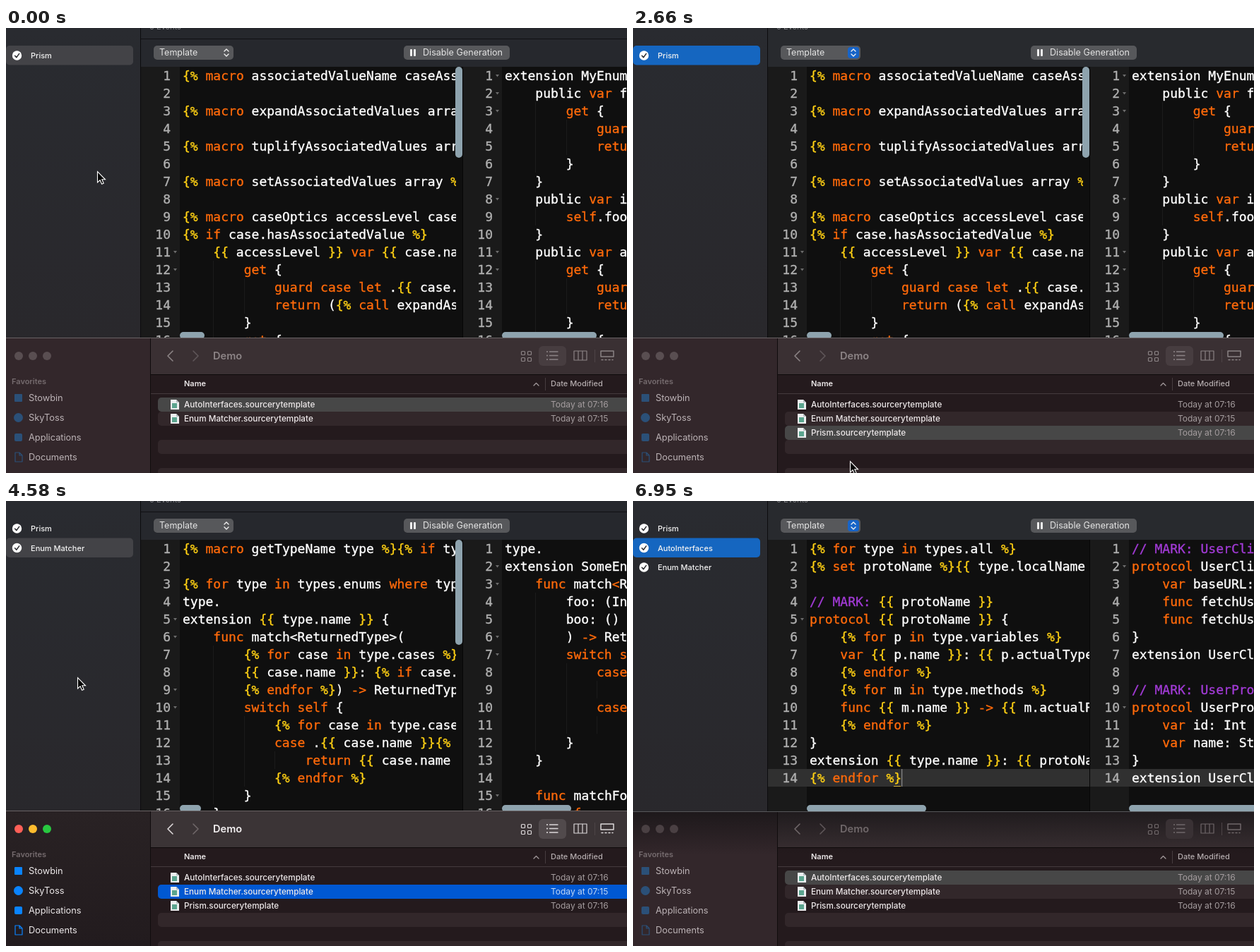
An HTML page that plays this animation: 879 by 631 pixels, repeating every 7.7 s.

```html
<!DOCTYPE html>
<html lang="en">
<head>
<meta charset="utf-8">
<title>Template drag and drop</title>
<style>
html, body { margin: 0; width: 100%; height: 100%; overflow: hidden; background: #26272b; }
svg { display: block; width: 100%; height: 100%; }
text { font-family: Inter, "Open Sans", sans-serif; white-space: pre; }
.code { font: 18px "DejaVu Sans Mono", monospace; color: #fff; }
.code, .code tspan { fill: currentColor; stroke: currentColor; stroke-width: .35; }
.num { color: #b0b0b0; text-anchor: end; }
.tag { color: #ffd014; }
.key { color: #ff6a0a; }
.note { color: #a23bd6; }
</style>
</head>
<body>
<svg id="stage" viewBox="0 0 879 631" xmlns="http://www.w3.org/2000/svg"></svg>
<script>
const LOOP = 7700, TICK = 147.6, CHAR = 10.836, ROW = 25;

const PRISM = {
  left: `{% macro associatedValueName caseAssociated

{% macro expandAssociatedValues array %}

{% macro tuplifyAssociatedValues array %}

{% macro setAssociatedValues array %}

{% macro caseOptics accessLevel cases %}
{% if case.hasAssociatedValue %}
    {{ accessLevel }} var {{ case.name }}
        get {
            guard case let .{{ case.name }}
            return ({% call expandAssociated
        }
        get {`,
  right: `extension MyEnum {
    public var foo
        get {
            guard case
            return
        }
    }
    public var isFoo
        self.foo
    }
    public var associated
        get {
            guard case
            return
        }
        get {`,
  foldsL: [11, 12], foldsR: [1, 2, 3, 8, 11, 12], bar: 129, barL: 35, barR: 134
};
const MATCHER = {
  left: `{% macro getTypeName type %}{% if type

{% for type in types.enums where type
type.
extension {{ type.name }} {
    func match<ReturnedType>(
        {% for case in type.cases %}
        {{ case.name }}: {% if case.has
        {% endfor %}) -> ReturnedType
        switch self {
            {% for case in type.cases
            case .{{ case.name }}{% if
                return {{ case.name
            {% endfor %}
        }
    }`,
  right: `type.
extension SomeEnum {
    func match<Return
        foo: (Int)
        boo: ()
        ) -> Returned
        switch self
            case
${' '.repeat(16)}
            case
${' '.repeat(16)}
        }
    }

    func matchFoo
        if`,
  foldsL: [5, 6, 9, 10], foldsR: [2, 3, 6, 7, 15], bar: 149, barL: 30, barR: 98
};
const AUTO = {
  left: `{% for type in types.all %}
{% set protoName %}{{ type.localName }}

// MARK: {{ protoName }}
protocol {{ protoName }} {
    {% for p in type.variables %}
    var {{ p.name }}: {{ p.actualType
    {% endfor %}
    {% for m in type.methods %}
    func {{ m.name }} -> {{ m.actualReturn
    {% endfor %}
}
extension {{ type.name }}: {{ protoName
{% endfor %}`,
  right: `// MARK: UserClient
protocol UserClient
    var baseURL: URL
    func fetchUser
    func fetchUsers
}
extension UserClient

// MARK: UserProfile
protocol UserProfile
    var id: Int
    var name: String
}
extension UserClient`,
  foldsL: [5], foldsR: [2, 10], bar: 0, barL: 169, barR: 200
};

const FILES = ['AutoInterfaces', 'Enum Matcher', 'Prism'];
const PLACES = ['Stowbin', 'SkyToss', 'Applications', 'Documents'];

// pointer stops: tick, x, y
const PATH = [
  [0, 129, 203], [2, 129, 203], [5, 86, 48], [6, 84, 44], [7, 96, 72], [8, 116, 130],
  [9, 141, 206], [10, 241, 505], [12, 293, 592], [15, 307, 614], [18, 307, 614],
  [21, 308, 565], [22, 308, 565], [26, 310, 555], [28, 200, 395], [29, 122, 270],
  [30, 101, 250], [32, 101, 250], [33, 112, 268], [37, 268, 518], [38, 274, 527],
  [41, 274, 527], [42, 252, 470], [43, 160, 240], [44, 96, 70], [45, 92, 62], [47, 300, 300]
];

const esc = s => s.replace(/&/g, '&amp;').replace(/</g, '&lt;').replace(/>/g, '&gt;');
const rect = (x, y, w, h, fill, r = 0, more = '') =>
  `<rect x="${x}" y="${y}" width="${w}" height="${h}" fill="${fill}" rx="${r}" ${more}/>`;
const dot = (x, y, r, fill) => `<circle cx="${x}" cy="${y}" r="${r}" fill="${fill}"/>`;
const line = (d, color, w = 1.4) =>
  `<path d="${d}" fill="none" stroke="${color}" stroke-width="${w}" stroke-linecap="round" stroke-linejoin="round"/>`;
const label = (x, y, s, size, fill, weight = 400) =>
  `<text x="${x}" y="${y}" font-size="${size}" fill="${fill}" font-weight="${weight}">${esc(s)}</text>`;
const moved = (x, y, body, opacity = 1) => `<g transform="translate(${x} ${y})" opacity="${opacity}">${body}</g>`;

function pointer(k) {
  const i = PATH.findIndex(p => p[0] > k);
  if (i < 0) return PATH[PATH.length - 1].slice(1);
  const [a, b] = [PATH[i - 1], PATH[i]];
  const f = (k - a[0]) / (b[0] - a[0]);
  return [a[1] + (b[1] - a[1]) * f, a[2] + (b[2] - a[2]) * f];
}

const TOKENS = new RegExp([
  '(?<note>\\/\\/ MARK:(?: User\\w+)?)', '(?<tag>\\{%|%\\}|\\{\\{|\\}\\})',
  '(?<key>->|(?<=^|guard )case\\b|<(?=Return\\b)|' +
  '\\b(?:macro|if|for|in|where|endfor|set|call|get|guard|let|return|var|func|switch|self|protocol)\\b)'
].join('|'), 'g');

function paint(text) {
  let out = '', end = 0;
  for (const m of text.matchAll(TOKENS)) {
    const kind = Object.keys(m.groups).find(g => m.groups[g]);
    out += esc(text.slice(end, m.index)) + `<tspan class="${kind}">${esc(m[0])}</tspan>`;
    end = m.index + m[0].length;
  }
  return out + esc(text.slice(end));
}

function codeLines(source, x, numX, folds) {
  return source.split('\n').map((text, i) => {
    const indent = text.search(/\S|$/), top = 55 + i * ROW;
    let out = `<text class="code num" x="${numX}" y="${top + 19}">${i + 1}</text>`;
    for (let c = 4; c < indent; c += 4) out += rect(Math.round(x + c * CHAR), top, 1, ROW, '#1b1b1b');
    if (folds.includes(i + 1)) out += `<path d="M${numX + 4} ${top + 11}h5l-2.5 3.5z" fill="#6c6c6c"/>`;
    return out + `<text class="code" x="${x + indent * CHAR}" y="${top + 19}">${paint(text.trim())}</text>`;
  }).join('');
}

function editors(L, R, caret) {
  const thumb = '#8ea3ae';
  let out = rect(191, 55, 688, 390, '#0f0f0f') + rect(191, 55, 55, 390, '#1a1a1a') + rect(647, 55, 55, 390, '#1a1a1a');
  if (caret) out += rect(191, 380, 688, ROW, '#303030');
  out += `<clipPath id="pane"><rect x="191" y="55" width="${L.bar ? 446 : 456}" height="390"/></clipPath>`;
  out += `<g clip-path="url(#pane)">${codeLines(L.left, 250, 233, L.foldsL)}</g>`;
  out += codeLines(R.right, 706, 689, R.foldsR) + rect(646, 55, 1, 390, '#060606');
  if (L.bar) out += rect(636, 55, 10, L.bar, thumb, 5);
  out += rect(246, 431, L.barL, 10, thumb, 5) + rect(702, 431, R.barR, 10, thumb, 5);
  if (caret) out += rect(380, 380, 1.2, ROW, '#8b8b8b') + rect(369, 404, 10, 1, '#d0b040');
  return out;
}

const checked = (y, name) => dot(15.5, y, 6.7, '#fff') +
  line(`M12.6 ${y + .3}l2.2 2.5 3.9-5.4`, '#2b2c30', 1.5) + label(35, y + 4, name, 11, '#f2f2f2', 500);

function sidebar(names, selected, blue, dropLine) {
  let out = rect(0, 0, 190, 445, 'url(#side)');
  if (selected >= 0) out += rect(0, 25 + selected * 27.5, 180, 27.5, blue ? '#1566c0' : '#434347', 5);
  names.forEach((n, i) => out += checked(39 + i * 27.5, n));
  return out + (dropLine ? rect(0, 51, 180, 2, '#0f62d2', 1) : '') + rect(190, 0, 1, 445, '#0c0c0e');
}

function toolbar(active) {
  let out = rect(191, 0, 688, 55, active ? '#282a2e' : '#26282d') + label(203, 1.5, '0 Events', 11, '#85868a');
  if (!active) out += rect(191, 15, 688, 1, '#0f1013');
  out += rect(209, 25, 113, 20, '#57585b', 5) + label(217, 39, 'Template', 12.5, '#e4e4e4');
  if (active) out += rect(304, 27, 16, 16, '#1764c8', 4);
  out += line('M309 33l3-3 3 3M309 37l3 3 3-3', '#f0f0f0');
  return out + rect(563, 25, 150, 20, '#57585b', 5) + rect(572, 30, 3, 10, '#eee', 1) +
    rect(577, 30, 3, 10, '#eee', 1) + label(590, 39, 'Disable Generation', 12.6, '#e4e4e4');
}

function fileName(i) {
  const y = 524 + i * 20;
  return `<path d="M233 ${y + 3}h8l4 4v10h-12z" fill="#eceff0"/><path d="M241 ${y + 3}v4h4z" fill="#b5bcc0"/>` +
    rect(235, y + 8, 7, 7, '#5ba58f') + label(252, y + 14, FILES[i] + '.sourcerytemplate', 11.72, '#eee9ea', 500);
}

function finder(count, selected, focused, shaded) {
  const top = shaded ? 440 : 439;
  const ink = focused ? '#dcd8d9' : shaded ? '#6f6769' : '#8b8385';
  const button = focused ? '#514a4c' : shaded ? '#393134' : '#473d40';
  let out = rect(0, top, 204, 200, focused ? 'url(#places)' : '#33272b') +
    rect(205, top, 674, 52, focused ? '#3b3436' : '#3a3033') +
    rect(205, 491, 674, 140, '#241a1d') + rect(205, 518, 674, 1, '#443a3d');
  if (shaded) out += rect(0, top, 879, 62, 'url(#shade)');
  out += rect(205, 491, 674, 1, '#0e0a0b') + rect(204, top, 1, 200, '#100c0d') +
    rect(0, top, 879, 1, shaded ? '#57575a' : '#696264');

  const lights = focused ? ['#ff5f57', '#febc2e', '#28c840'] : Array(3).fill(shaded ? '#4a4043' : '#594e51');
  lights.forEach((c, i) => out += dot(18 + i * 20, 465, 6, c));
  out += label(8, 505, 'Favorites', 11, '#766c6f', 600);
  const blue = focused ? '#0a84ff' : '#2b5078';
  out += rect(12, 519, 11, 11, blue, 1) + dot(17.5, 552.5, 6.5, blue) + rect(12, 575, 11, 11, blue, 2) +
    line('M13 602h6l4 4v9h-10zM19 602v4h4', blue, 1.2);
  PLACES.forEach((p, i) => out += label(32, 529 + i * 28, p, 12.8, focused ? '#ece8e9' : '#bcb3b6'));

  out += line('M236 458l-7 7 7 7', ink, 1.6) + line('M265 458l7 7-7 7', focused ? '#6f6769' : '#5f5659', 1.6) +
    label(293, 470, 'Demo', 14.6, focused ? '#f0edee' : ink, 600);
  out += rect(754, 451, 39, 28, button, 6);
  for (const x of [729, 738]) for (const y of [458, 467])
    out += rect(x + .5, y + .5, 5, 5, 'none', 1, `stroke="${ink}" stroke-width="1.2"`);
  for (const y of [459, 464.5, 470]) out += dot(766, y, 1.1, ink) + line(`M769.5 ${y}h11.5`, ink);
  out += line('M804 458h18v13h-18zM810 458v13M816 458v13', ink, 1.2) + rect(833, 456, 1, 18, '#4d4447') +
    line('M842 458h18v8h-18zM843 470.5h2M848 470.5h2M853 470.5h2M858 470.5h1', ink, 1.5);
  out += label(252, 508, 'Name', 11, '#ece8e9', 600) + label(771, 508, 'Date Modified', 11, '#b4acae', 500) +
    line('M747 507l3.5-3.5 3.5 3.5', '#a39b9d', 1.2) + rect(763, 496, 1, 18, '#463c3f');

  for (const i of [1, 3, 5]) out += rect(215, 524 + i * 20, 700, 20, '#32272a', 5);
  out += rect(215, 524 + selected * 20, 700, 20, focused ? '#0058d2' : '#474747', 5);
  for (let i = 0; i < count; i++) {
    const tint = focused && i === selected ? '#c4d8f5' : '#a59d9f';
    out += fileName(i) + label(771, 538 + i * 20, `Today at 07:1${i === 1 ? 5 : 6}`, 12, tint);
  }
  return out;
}

function arrow(x, y, plus) {
  const badge = dot(10, 22, 9, '#22a022') + line('M10 17.5v9M5.5 22h9', '#fff', 2);
  return moved(x + .5, y + .5, '<path d="M0 0V15.5L3.6 12.2 6.1 17.8 8.7 16.7 6.3 11.3H11Z" fill="#000" stroke="#fff" stroke-width="1.1"/>' +
    (plus ? badge : ''));
}

const DEFS = `<defs>
  <linearGradient id="side" x2="0" y2="1"><stop stop-color="#292b30"/><stop offset="1" stop-color="#29282c"/></linearGradient>
  <linearGradient id="places" x2="0" y2="1"><stop stop-color="#292224"/><stop offset="1" stop-color="#221b1e"/></linearGradient>
  <linearGradient id="shade" x2="0" y2="1"><stop stop-color="#141214" stop-opacity=".7"/><stop offset="1" stop-color="#141214" stop-opacity="0"/></linearGradient>
</defs>`;

function scene(k) {
  const appFront = (k >= 6 && k < 18) || k >= 47;
  const appLit = appFront || k === 18;
  const finderLit = k >= 19 && k < 47;
  const left = k < 30 ? PRISM : k < 45 ? MATCHER : AUTO;
  const right = k < 31 ? PRISM : k < 46 ? MATCHER : AUTO;
  const names = k < 30 ? ['Prism'] : k < 45 ? ['Prism', 'Enum Matcher'] : ['Prism', 'AutoInterfaces', 'Enum Matcher'];
  const overList = k === 8 || k === 9 || k === 29 || k === 44;
  const picked = k < 14 ? 0 : k < 25 ? 2 : k < 38 ? 1 : 0;

  const [x, y] = pointer(k);
  const dragPrism = k >= 7 && k < 14, dragEnum = k >= 27 && k < 30, dragAuto = k >= 42 && k < 45;
  let ghost = '';
  if (dragPrism) ghost = moved(x - 99, y - 95, checked(39, 'Prism'));
  if (dragEnum) ghost = moved(x - 310, y - 555, fileName(1), .8);
  if (dragAuto) ghost = moved(x - 274, y - 527, fileName(0), .8);

  return DEFS + editors(left, right, k >= 47) + toolbar(appLit) +
    sidebar(names, k < 30 ? 0 : 1, appLit && !overList, overList) +
    finder(k < 14 ? 2 : 3, picked, finderLit, appFront) + ghost +
    (k < 47 ? arrow(x, y, dragPrism || overList) : '');
}

const stage = document.getElementById('stage');
let shown = -1;
function play() {
  const k = Math.floor((performance.now() % LOOP + 10) / TICK);
  if (k !== shown) stage.innerHTML = scene(shown = k);
  requestAnimationFrame(play);
}
play();
</script>
</body>
</html>
```
